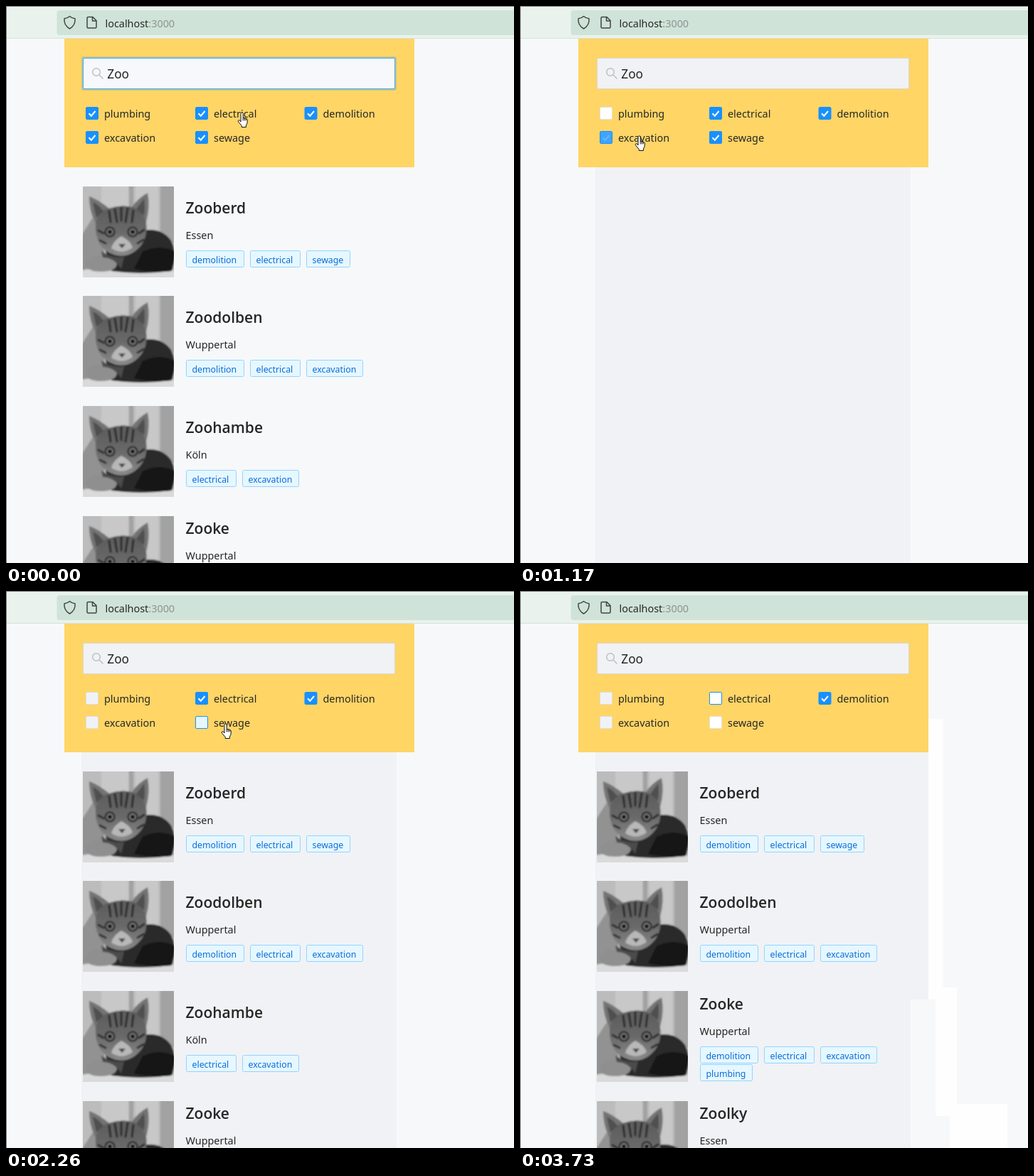
An HTML page that plays this animation: 714 by 784 pixels, repeating every 3980 ms.

```html
<!DOCTYPE html>
<html lang="en">
<head>
<meta charset="utf-8">
<title>Directory filter</title>
<style>
  html, body { margin: 0; width: 100%; height: 100%; overflow: hidden; background: #f7f8fa; }
  svg { display: block; width: 100%; height: 100%; }
  text { font: 14.4px "Noto Sans", "Open Sans", sans-serif; fill: #262626; }
  .title { font: 600 21px "Open Sans", "Noto Sans", sans-serif; }
  .tag rect { fill: #e6f7ff; stroke: #91d5ff; }
  .tag text { font-size: 12.35px; fill: #096dd9; }
  .query { font-size: 17.2px; }
  .line { fill: none; stroke-linecap: round; stroke-linejoin: round; }
</style>
</head>
<body>
<svg viewBox="0 0 714 784">
  <defs>
    <clipPath id="frame"><path d="M0 0h128v128H0z"/></clipPath>
    <filter id="soft" x="-10%" y="-10%" width="120%" height="120%"><feGaussianBlur stdDeviation=".9"/></filter>
    <linearGradient id="fur" x1="0" x2="0" y1="0" y2="1">
      <stop offset="0" stop-color="#5c5c5c"/>
      <stop offset=".5" stop-color="#686868"/>
      <stop offset="1" stop-color="#8a8a8a"/>
    </linearGradient>
    <g id="cat" clip-path="url(#frame)">
      <path fill="#bcbcbc" d="M0 0h128v128H0z"/>
      <g filter="url(#soft)">
        <path fill="#c8c8c8" d="M26 -4h38v50H26zM74 -4h32v74H74z"/>
        <path fill="#a2a2a2" d="M65 -4h6v44h-6zM109 -4h22v84h-22z"/>
        <path fill="#929292" d="M-4 72L14 44L30 70V132H-4z"/>
        <path fill="#dadada" d="M-4 118Q60 110 132 119V132H-4z"/>
        <path fill="#2a2a2a" d="M76 64Q108 54 124 76Q134 100 123 119Q82 125 40 119L32 90Z"/>
        <path fill="#131313" d="M84 92Q108 80 130 92L125 119Q98 122 72 116Z"/>
        <path fill="#737373" d="M9 14Q24 20 37 31Q53 25 69 29Q78 16 91 9Q95 28 89 50Q92 78 72 92Q55 103 35 92Q17 80 18 52Q9 34 9 14Z"/>
        <path fill="url(#fur)" d="M18 52Q23 33 37 31Q53 25 69 29Q85 34 89 52Q92 78 72 92Q55 103 35 92Q17 80 18 52Z"/>
        <path fill="#505050" d="M14 22Q23 26 29 35L19 44ZM86 17Q88 30 86 41L75 32Z"/>
        <path fill="#b8b8b8" d="M54 70Q67 76 70 86Q55 97 40 87Q43 76 54 70Z"/>
        <path class="line" stroke="#2b2b2b" stroke-width="3" d="M45 32L48 50M54 30V48M63 31L60 50M37 35L39 50M71 34L69 50M22 62L29 66M86 61L79 66M24 76L32 80M85 75L77 80"/>
        <g fill="#202020"><circle cx="38" cy="64" r="7.500"/><circle cx="70" cy="64" r="7.500"/></g>
        <g fill="#808080"><circle cx="38" cy="64" r="5"/><circle cx="70" cy="64" r="5"/></g>
        <g fill="#101010"><circle cx="38" cy="64" r="3"/><circle cx="70" cy="64" r="3"/></g>
        <path fill="#444" d="M50 81h10l-5 6z"/>
        <path fill="#8f8f8f" d="M5 106Q14 92 28 99Q42 97 48 109Q46 120 26 120Q2 120 5 106Z"/>
        <path fill="#4c4c4c" d="M26 91Q40 102 58 99L54 116Q44 100 28 100Z"/>
      </g>
    </g>
  </defs>

  <path fill="#f7f8fa" d="M0 0h714v784H0z"/>
  <path fill="#e9f2ed" d="M0 0h714v45H0z"/>
  <path fill="#d5e3db" d="M0 45h714v1H0z"/>
  <rect x="71.5" y="6" width="660" height="35" rx="4" fill="#d0e3d8"/>
  <g class="line" stroke="#3f4642" stroke-width="1.5">
    <path d="M89.5 14.5Q93 17.5 97 17.7Q98 27 89.5 32Q81 27 82 17.7Q86 17.5 89.5 14.5Z"/>
    <path d="M115.5 15.5h6.5l5 5v9q0 1.5-1.5 1.5h-10q-1.5 0-1.5-1.5v-12.5q0-1.5 1.5-1.5zM121.5 16v5h5"/>
  </g>
  <text x="139.5" y="30">localhost<tspan fill="#8a9690">:3000</tspan></text>

  <path id="panel" fill="#f1f2f5" d="M106 227h443v557H106z"/>
  <g id="list"></g>
  <path fill="#ffd566" d="M82 46h492v181H82z"/>
  <rect id="glow" x="106" y="71" width="443" height="48" rx="3" fill="#1890ff"/>
  <rect id="field" x="108.5" y="73.5" width="438" height="43" rx="1.5"/>
  <g class="line" stroke="#bfbfbf" stroke-width="1.5">
    <circle cx="127" cy="93" r="5.3"/><path d="M131 97l5 5"/>
  </g>
  <text class="query" x="142.3" y="102">Zoo</text>
  <g id="boxes"></g>
  <g id="trails">
    <path data-from="3310" fill="#f1f2f5" d="M549 227h25v348H549z"/>
    <path data-from="3310" fill="#fefefe" d="M574 180h20.5v395H574z"/>
    <path data-from="3460" fill="#fefefe" d="M584 558h30v181h-30z"/>
    <path data-from="3580" fill="#fefefe" d="M604 722h81v62h-81z"/>
  </g>
  <path fill="#777" d="M0 0h714v1H1v783H0z"/>
  <g id="hand">
    <path d="M5 14V2.500a1.600 1.600 0 0 1 3.200 0V8.300l4 .9q2.300.6 2.200 2.800l-.5 4.200-1.500 2.800v2.500H6.200v-2L2 14.500Q.4 12.200 2 11.600q1.400-.4 3 2.400Z" fill="#fff" stroke="#111" stroke-linejoin="round"/>
    <path class="line" stroke="#111" d="M8.200 8.500v3.500M10.300 9v3M12.300 9.500v2.500"/>
  </g>
  <path id="arrow" d="M.5.5v14l3.300-3 2.200 5 2-1-2.100-4.700h4.600z" fill="#fff" stroke="#111"/>
</svg>

<script>
const LOOP = 3980;
const $ = id => document.getElementById(id);

const tagWidths = { demolition: 81, electrical: 70, sewage: 61, excavation: 79, plumbing: 73 };
const firms = {
  a: ["Zooberd", "Essen", ["demolition", "electrical", "sewage"]],
  b: ["Zoodolben", "Wuppertal", ["demolition", "electrical", "excavation"]],
  c: ["Zoohambe", "Köln", ["electrical", "excavation"]],
  d: ["Zooke", "Wuppertal", ["demolition", "electrical", "excavation", "plumbing"]],
  e: ["Zoolky", "Essen", ["demolition", "electrical", "excavation", "plumbing"]]
};

function tagsMarkup(tags, top) {
  let x = 253.5;
  return tags.map((name, i) => {
    if (i === 3) { x = 253.5; top += 25; }
    const width = tagWidths[name];
    const mark = `<g class="tag"><rect x="${x}" y="${top}" width="${width}" height="23" rx="2"/>` +
      `<text x="${x + 8}" y="${top + 17}">${name}</text></g>`;
    x += width + 9;
    return mark;
  }).join("");
}

function listMarkup(keys) {
  return [...keys].map((key, row) => {
    const [name, city, tags] = firms[key];
    const top = 253.7 + row * 154.67;
    const y = Math.round(top - (tags.length > 3 ? 12.3 : 0));
    return `<use href="#cat" x="108" y="${Math.round(top)}"/>` +
      `<text class="title" x="252.5" y="${y + 38}">${name}</text>` +
      `<text x="252.5" y="${y + 74}">${city}</text>` + tagsMarkup(tags, y + 90.5);
  }).join("");
}

// fill, border, tick
const looks = {
  on: ["#1890ff", "#1890ff", "#fff"],
  fade: ["#40a3ff", "#1890ff", "#63b9f5"],
  hover: ["#e6f7ff", "#1890ff", "none"],
  open: ["#fff", "#1890ff", "none"],
  pale: ["#fff", "#91c9f5", "none"],
  white: ["#fff", "#e2e2e2", "none"],
  off: ["#f1f2f5", "#dedede", "none"]
};

const boxes = [
  ["plumbing", 112, 142, [[0, "on"], [660, "fade"], [780, "hover"], [930, "open"], [1050, "white"],
    [1290, "off"], [2680, "white"], [2800, "off"]]],
  ["electrical", 266, 142, [[0, "on"], [2800, "hover"], [2920, "open"]]],
  ["demolition", 419.5, 142, [[0, "on"]]],
  ["excavation", 112, 176, [[0, "on"], [1170, "fade"], [1290, "hover"], [1440, "open"],
    [2140, "off"], [2680, "white"], [2800, "off"]]],
  ["sewage", 266, 176, [[0, "on"], [2140, "fade"], [2260, "hover"], [2410, "open"],
    [2680, "pale"], [2800, "white"]]]
];

const lists = [[0, "abcd"], [660, ""], [780, "abcd"], [1170, ""], [1290, "abcd"],
  [2140, ""], [2260, "abcd"], [2680, ""], [2800, "abde"]];

const handPath = [[0, 325, 149], [120, 266, 174], [270, 215, 170], [390, 185, 161], [510, 172, 155],
  [780, 172, 161], [930, 169, 172], [1050, 162, 181], [1170, 161, 182], [1440, 205, 184],
  [1560, 290, 186], [1710, 301, 187], [2140, 302, 186], [2410, 312, 165], [2560, 311, 156],
  [2680, 311, 155], [3190, -50, -50]];
const arrowPath = [[0, -50, -50], [3190, 332, 180], [3310, 584, 558], [3460, 603, 722],
  [3580, 683, 783], [3730, -50, -50]];

// fill, border, glow opacity
const fields = [[0, "#f7f8fb", "#40a9ff", .25], [510, "#f7f8fb", "#8cbfe6", .12], [660, "#f1f2f5", "#d9d9d9", 0]];

const at = (track, time) => track.findLast(step => step[0] <= time);
const show = (node, on) => node.setAttribute("visibility", on ? "visible" : "hidden");

$("boxes").innerHTML = boxes.map(([name, x, y]) =>
  `<g><rect x="${x + .5}" y="${y + .5}" width="17" height="17" rx="1.5"/>` +
  `<path d="M${x + 4.5} ${y + 9.2}l3.3 3.5 5.7-6.7" fill="none" stroke-width="2"/>` +
  `<text x="${x + 26}" y="${y + 14.8}">${name}</text></g>`).join("");

function drawBoxes(time) {
  boxes.forEach(([, , , track], i) => {
    const [fill, border, tick] = looks[at(track, time)[1]];
    const [rect, path] = $("boxes").children[i].children;
    rect.setAttribute("fill", fill);
    rect.setAttribute("stroke", border);
    path.setAttribute("stroke", tick);
  });
}

function place(id, track, time) {
  const [, x, y] = at(track, time);
  $(id).setAttribute("transform", `translate(${x} ${y})`);
}

let shown = null;
function draw(time) {
  const keys = at(lists, time)[1];
  if (keys !== shown) $("list").innerHTML = listMarkup(shown = keys);

  const [, fill, border, glow] = at(fields, time);
  $("field").setAttribute("fill", fill);
  $("field").setAttribute("stroke", border);
  $("glow").setAttribute("opacity", glow);

  show($("panel"), time >= 660);
  for (const trail of $("trails").children) show(trail, time >= +trail.dataset.from);
  drawBoxes(time);
  place("hand", handPath, time);
  place("arrow", arrowPath, time);
}

const start = performance.now();
function tick() {
  draw((performance.now() - start) % LOOP);
  requestAnimationFrame(tick);
}
tick();
</script>
</body>
</html>
```
